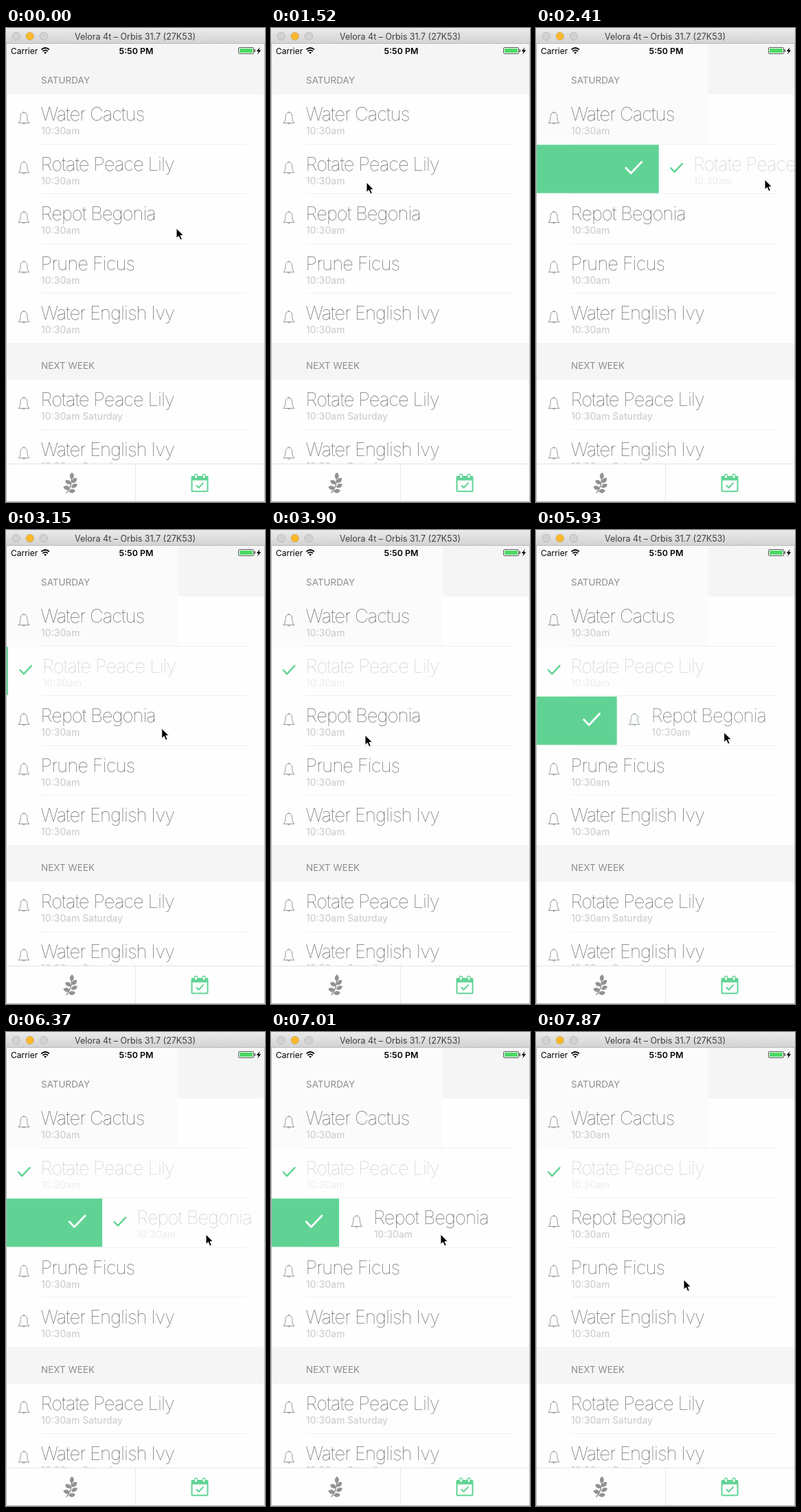
Animation, 377 px wide and 691 px high, one loop 8000 ms. Source, as an HTML page:

```html
<!DOCTYPE html>
<html lang="en">
<head>
<meta charset="utf-8">
<title>Plant reminders</title>
<style>
  html, body { margin: 0; width: 100%; height: 100%; overflow: hidden; background: #fff; }
  svg { display: block; width: 100%; height: 100%; font-family: Inter, Roboto, sans-serif; }
  .title { font-size: 27.5px; font-weight: 100; letter-spacing: -1px; fill: #505050; }
  .time { font-size: 13.8px; font-weight: 500; fill: #cfcfcf; }
  .section { font-size: 13.5px; fill: #8d8d8d; }
  .status { font-size: 12px; }
  .line { fill: none; stroke-linecap: round; stroke-linejoin: round; }
</style>
</head>
<body>
<svg id="stage" viewBox="0 0 377 691"></svg>
<script>
const DURATION = 8000;
const ROW_HEIGHT = 72.5;
const GREEN = '#60d394';
const GRAY = '#929292';
const stage = document.getElementById('stage');

const rect = (x, y, w, h, fill, extra = '') =>
  `<rect x="${x}" y="${y}" width="${w}" height="${h}" fill="${fill}" ${extra}/>`;
const text = (x, y, cls, str, extra = '') =>
  `<text x="${x}" y="${y}" class="${cls}" ${extra}>${str}</text>`;
const line = (d, color, width) =>
  `<path class="line" d="${d}" stroke="${color}" stroke-width="${width}"/>`;
const tick = (x, y, size, color, width) =>
  line(`M${x} ${y}l${size * .32} ${size * .34} ${size * .68}-${size * .72}`, color, width);

const bell = line(
  'M18.3 41.2q2.8-2 2.8-8.4c0-4 1.7-6.6 4.9-6.6s4.9 2.6 4.9 6.6q0 6.4 2.8 8.4z' +
  'M24.8 26.1q1.2-2.5 2.4 0M23.9 41.4q2.1 3.6 4.2 0', '#969696', 1);

function row(top, title, time) {
  const id = title.split(' ').pop();
  return `<g class="row ${id}" transform="translate(0 ${top})">
    <g class="green">
      ${rect(-376, .75, 376, 70.5, GREEN)}
      ${tick(-48, 34.5, 23, '#fff', 2.8)}
    </g>
    <g class="content">
      <g class="bell">${bell}</g>
      <g class="check" opacity="0">${tick(18, 34.7, 16.5, GREEN, 2.4)}</g>
      <g class="label">${text(50.5, 38, 'title', title)}${text(51, 58, 'time', time)}</g>
    </g>
  </g>`;
}

const section = (top, height, label) =>
  rect(1, top, 375, height, '#f5f5f5') + text(51, top + height - 16, 'section', label);

function list(top, time, titles) {
  const rowTop = i => top + i * ROW_HEIGHT;
  const separators = titles.slice(1).map((_, i) =>
    rect(51, Math.floor(rowTop(i + 1) - .5), 300, 1, '#f1f1f1'));
  return separators.concat(titles.map((title, i) => row(rowTop(i), title, time))).join('');
}

const leaf = (x, y, angle) =>
  `<path d="M0 0C-4-3-4-7 0-10 4-7 4-3 0 0z" transform="translate(${x} ${y}) rotate(${angle})"/>`;

const titleBar = `
  ${rect(0, 0, 377, 23, 'url(#bar)')}
  ${rect(0, 22, 377, 1, '#b9b9b9')}
  ${['#d2d2d2', '#fdb92c', '#d2d2d2'].map((color, i) =>
    `<circle cx="${14.8 + 20 * i}" cy="12" r="5.7" fill="${color}" stroke="#0002"/>`).join('')}
  ${text(188, 17, '', 'Velora 4t – Orbis 31.7 (27K53)', 'font-size="12.5" fill="#404040" text-anchor="middle"')}`;

const statusBar = `
  ${text(7, 38, 'status', 'Carrier')}
  ${text(189.5, 38, 'status', '5:50 PM', 'style="font-size:12.4px" font-weight="600" text-anchor="middle"')}
  <path d="M51.5 31.5q5.700-5 11.400 0M53.500 34q3.700-3.200 7.400 0" fill="none" stroke="#000" stroke-width="1.7"/>
  <path d="M55.200 35.700q2-1.500 4 0l-2 2.100z"/>
  ${rect(338.5, 28.5, 22, 9, '#fff', 'rx="1.5" stroke="#555"')}
  ${rect(340, 30, 19, 6, '#4cd964')}
  ${rect(361.5, 31, 1.5, 4, '#555')}
  <path d="M369.500 28l-4.800 6h2.800l-1.500 4.500 5.200-6.200h-3z"/>`;

const tabBar = `
  ${rect(1, 635, 375, 55, '#fefefe')}
  ${rect(1, 635, 375, 1, '#e2e2e2')}
  ${rect(188, 636, 1, 54, '#e6e6e6')}
  <g fill="${GRAY}">
    ${line('M88 677.5Q96 669 95.500 655', GRAY, 1.5)}
    ${leaf(95.5, 658, 4)}
    ${leaf(95, 664.5, -62)}${leaf(95.8, 663, 46)}
    ${leaf(93, 671.5, -76)}${leaf(95, 669.5, 64)}
    ${leaf(91, 675.5, 84)}
  </g>
  ${rect(270.5, 654, 23, 21.5, 'none', `rx="1.5" stroke="${GREEN}" stroke-width="2"`)}
  ${rect(270, 653.5, 24, 6, GREEN)}
  ${[274.5, 286].map(x => rect(x, 650.5, 4, 6, '#fefefe', `rx="1.5" stroke="${GREEN}" stroke-width="1.3"`)).join('')}
  ${tick(277.5, 667, 9.5, GREEN, 2)}`;

stage.innerHTML = `
  <defs><linearGradient id="bar" x2="0" y2="1">
    <stop stop-color="#eaeaea"/><stop offset="1" stop-color="#d2d2d2"/>
  </linearGradient></defs>
  ${rect(0, 0, 377, 691, '#fefefe')}
  ${rect(1, 23, 375, 74, '#f5f5f5')}
  ${rect(1, 23, 249, 147, '#fbfbfb', 'id="pale"')}
  ${text(51, 81, 'section', 'SATURDAY')}
  ${list(97, '10:30am',
    ['Water Cactus', 'Rotate Peace Lily', 'Repot Begonia', 'Prune Ficus', 'Water English Ivy'])}
  ${section(459, 54, 'NEXT WEEK')}
  ${list(513, '10:30am Saturday', ['Rotate Peace Lily', 'Water English Ivy'])}
  ${tabBar}
  ${titleBar}
  ${statusBar}
  <path d="M.5 23V690.5H376.500V23" fill="none" stroke="#b4b4b4"/>
  <path id="cursor" d="M0 0V14.500L3.400 11.400 5.800 17 8.300 15.900 6 10.500H10.500z" stroke="#fff"/>`;

const clamp = p => Math.min(1, Math.max(0, p));
const easeOut = p => 1 - (1 - clamp(p)) ** 2;

// Each pointer move: start, end, and where it arrives.
const moves = [
  [860, 1520, 139, 225],
  [1730, 2410, 333, 221],
  [2860, 3450, 190, 313],
  [3450, 3900, 137, 299],
  [4110, 4600, 276, 296],
  [5020, 5400, 247, 295],
  [5670, 6370, 291, 295],
  [6550, 7130, 245, 295],
  [7520, 7870, 215, 361]
];

function pointer(t) {
  let x = 248, y = 292;
  for (const [start, end, toX, toY] of moves) {
    const p = easeOut((t - start) / (end - start));
    x += (toX - x) * p;
    y += (toY - y) * p;
  }
  return { x, y };
}

const swipes = [
  { id: 'Lily', grab: 1730, release: 2860 },
  { id: 'Begonia', grab: 4110, release: 7520 }
];
const SLACK = 14, LAG = 65, RETURN = 330;

// A held row trails the pointer, and slides home once let go.
function swipeState({ grab, release }, t) {
  const held = Math.max(grab, Math.min(t, release));
  const pull = Math.max(0, pointer(held - LAG).x - pointer(grab).x - SLACK);
  const dx = pull * (1 - easeOut((t - release) / RETURN));
  return { dx, done: clamp((pull - 116.5) / 6) };
}

const rowOf = id => stage.querySelector(`.${id}`);
const set = (element, name, value) => element.setAttribute(name, value);

function draw(t) {
  for (const swipe of swipes) {
    const { dx, done } = swipeState(swipe, t);
    const part = name => rowOf(swipe.id).querySelector(`.${name}`);
    set(part('green'), 'transform', `translate(${dx + .5} 0)`);
    set(part('content'), 'transform', `translate(${dx} 0)`);
    set(part('bell'), 'opacity', 1 - done);
    set(part('check'), 'opacity', done);
    set(part('label'), 'opacity', 1 - .68 * done);
  }
  const { x, y } = pointer(t);
  set(stage.querySelector('#cursor'), 'transform', `translate(${x} ${y})`);
  set(stage.querySelector('#pale'), 'visibility', t >= swipes[0].grab ? 'visible' : 'hidden');
}

const start = performance.now();
function frame() {
  draw((performance.now() - start) % DURATION);
  requestAnimationFrame(frame);
}
frame();
</script>
</body>
</html>
```
